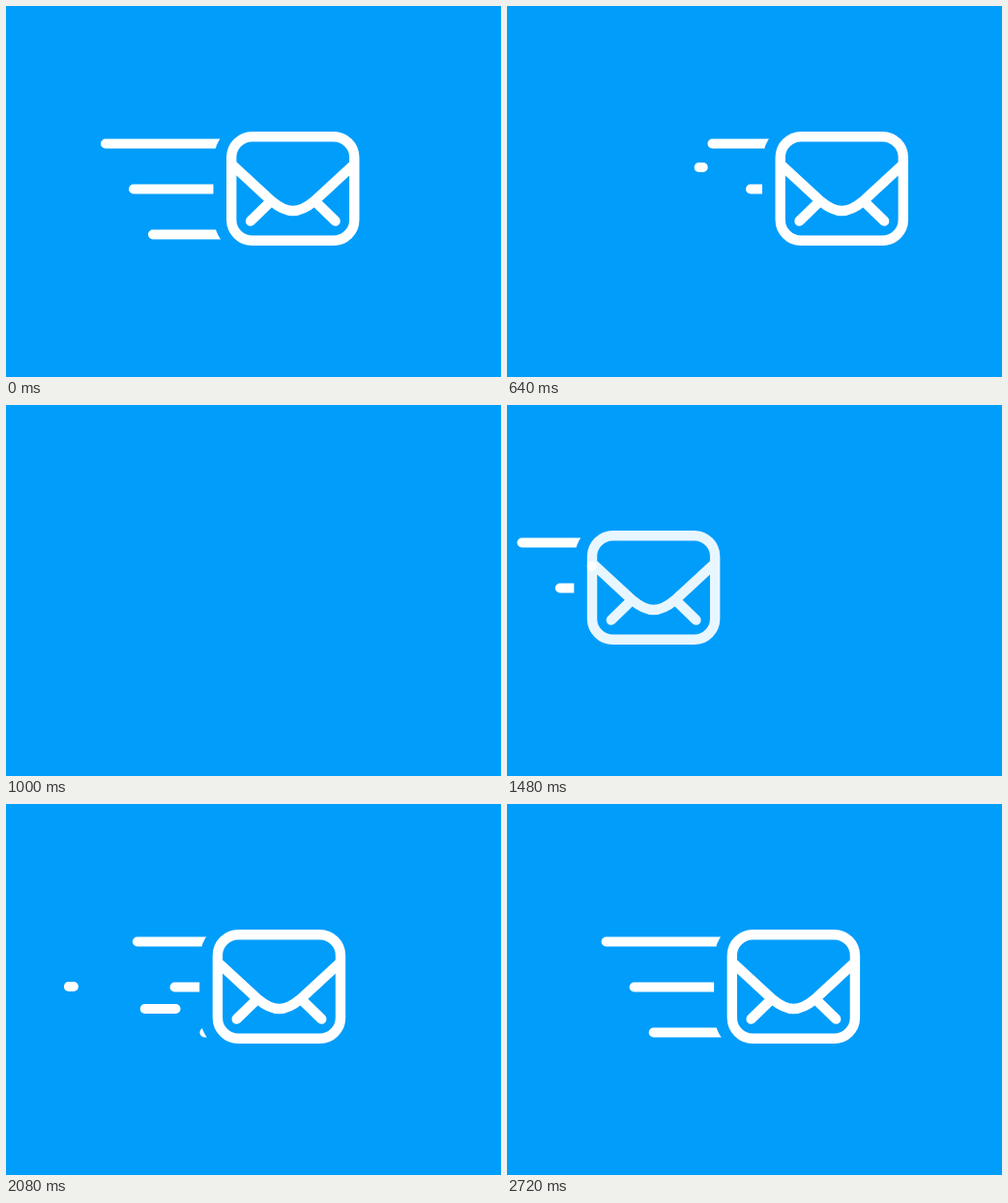
Recreate the animation shown at these times as an HTML page with a canvas. Size 512 px wide and 384 px high, loop 3.04 s.

```html
<!DOCTYPE html>
<html lang="en">
<head>
<meta charset="utf-8">
<title>Sending mail</title>
<style>
  html, body { margin: 0; height: 100%; overflow: hidden; background: #009dfa; }
  canvas { display: block; }
</style>
</head>
<body>
<canvas id="stage" width="512" height="384"></canvas>
<script>
const ctx = document.getElementById('stage').getContext('2d');
const LOOP = 3040, STEP = 40, BLUE = '#009dfa';

const clamp = v => Math.min(1, Math.max(0, v));
const easeOut = p => 1 - (1 - clamp(p)) ** 4;

// Position of the envelope relative to its resting place.
function offset(t) {
  if (t < 1200) return 5.9 * (Math.exp(0.0035 * t) - 1);
  if (t < 1480) return -146.5 - 0.44 * (1480 - t);
  return Math.min(0, 1 - 51 * Math.exp(-0.00376 * (t - 1760)));
}

function opacity(t) {
  return clamp(t < 1200 ? (1000 - t) / 160 : (t - 1330) / 165);
}

function fillRounded(x, y, w, h, r, color) {
  ctx.fillStyle = color;
  ctx.beginPath();
  ctx.roundRect(x, y, w, h, r);
  ctx.fill();
}

function drawPill(left, y, length) {
  if (length > 3) fillRounded(left, y - 4.9, length, 9.8, 4.9, 'white');
}

// In each lane a head runs out to the left, then the tail follows it.
function drawWave(t, lanes, origin, start, leave, duration, stagger) {
  lanes.forEach(([y, reach], i) => {
    const progress = from => easeOut((t - from - i * stagger) / duration);
    const head = reach * progress(start), tail = reach * progress(leave);
    drawPill(origin - head, y, head - tail);
  });
}

function drawSpacedStreaks(t) {
  const lanes = [[142.5, 130], [189.5, 101], [236.5, 81]];
  drawWave(t, lanes, 0, 552, 660, 500, 45);
  drawWave(t, lanes, 0, 1388, 1690, 500, 45);
  // The last wave stays out until the next loop has begun.
  for (const time of [t, t + LOOP]) {
    drawWave(time, lanes, 0, 1901, LOOP + 20, 800, 72);
  }
  if (t > 1680 && t < 2200) drawPill(-154 * easeOut((t - 1428) / 800), 189, 15);
}

function drawTouchingStreaks(t) {
  const lanes = [[167, 105], [212, 85]];
  drawWave(t, lanes, 10, 468, 520, 400, -150);
  drawWave(t, lanes, 10, 1470, 1825, 400, 190);
}

function drawEnvelope(color) {
  fillRounded(5.2, 135.2, 127.1, 107.6, 21.5, BLUE);
  ctx.strokeStyle = color;
  ctx.lineWidth = 10.4;
  ctx.lineCap = 'round';
  ctx.stroke();
  ctx.stroke(new Path2D('M7.8 166L46.8 202Q58.8 212 68.8 212T90.8 202L129.8 166' +
    'M44 204L25 222.5M93.6 204L112.6 222.5'));
}

function draw(t) {
  ctx.fillStyle = BLUE;
  ctx.fillRect(0, 0, 512, 384);
  const a = opacity(t);
  if (!a) return;
  ctx.save();
  ctx.translate(228 + offset(t), 0);
  drawSpacedStreaks(t);
  fillRounded(-13.5, 117, 164.5, 144, 44, BLUE);
  drawEnvelope(`rgb(${255 * a}, ${157 + 98 * a}, ${250 + 5 * a})`);
  drawTouchingStreaks(t);
  ctx.restore();
}

function tick() {
  draw(Math.floor(performance.now() % LOOP / STEP) * STEP);
  requestAnimationFrame(tick);
}
tick();
</script>
</body>
</html>
```
